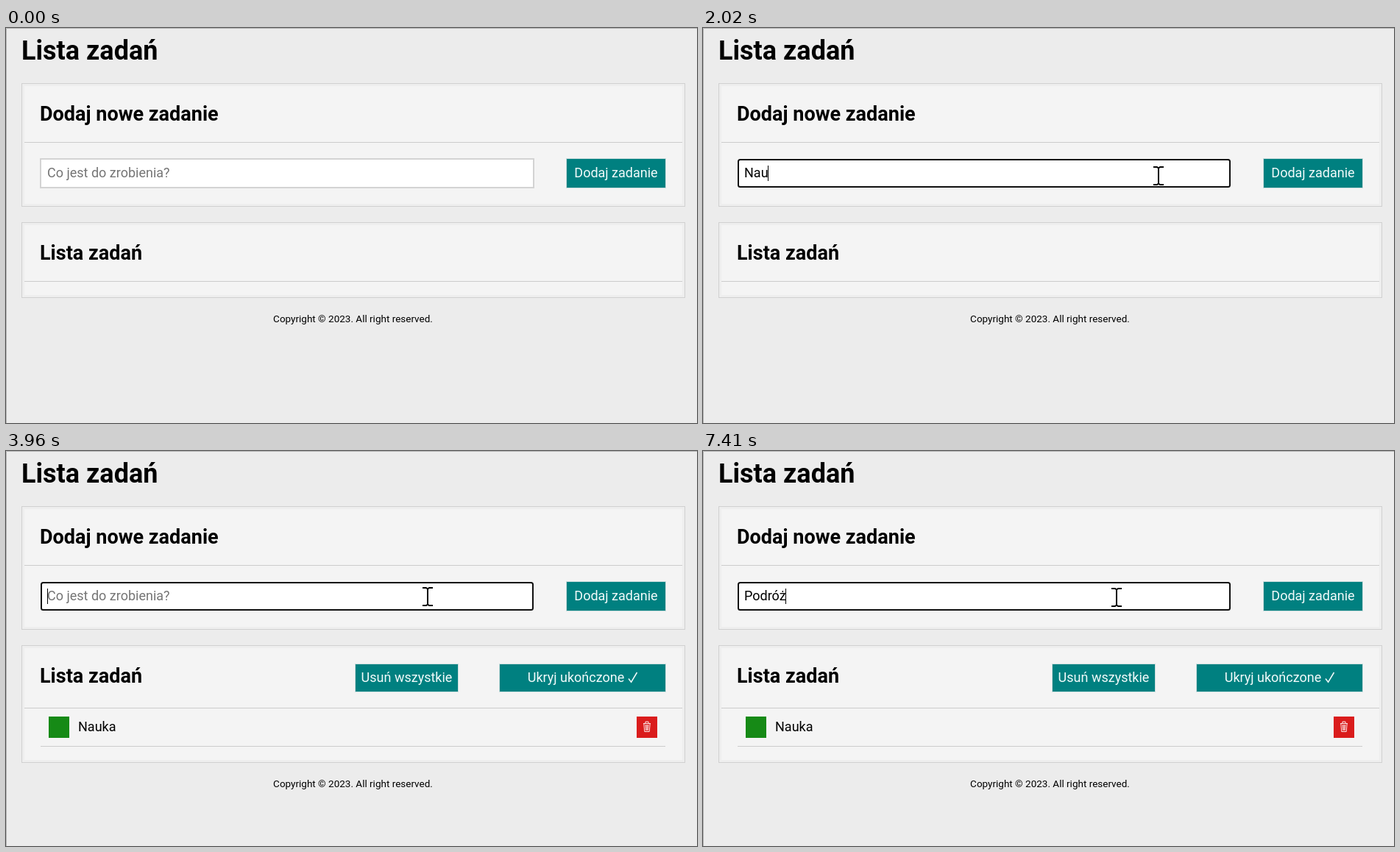
Animation of 939 by 537 pixels, one loop 8 s. Source, as an HTML page:

```html
<!DOCTYPE html>
<html lang="pl">
<head>
<meta charset="utf-8">
<title>Lista zadań</title>
<style>
html, body { margin: 0; width: 100%; height: 100%; overflow: hidden; background: #ececec; }
svg { display: block; width: 939px; height: 537px; font: 18px Roboto, sans-serif; }
h1, .h1 { font-size: 36px; font-weight: 700; }
.h2 { font-size: 27px; font-weight: 700; }
.small { font-size: 13.5px; }
.mid { text-anchor: middle; }
.frame { fill: #eee; stroke: #d0d0d0; }
.panel { fill: #f4f4f4; }
.line { fill: #ccc; }
.btn rect { fill: teal; stroke: #c9dcdc; }
.btn text { fill: #f2fafa; text-anchor: middle; }
.hint { fill: #757575; }
.field { fill: #fff; stroke: #d3d3d3; stroke-width: 2; }
.ring { fill: #fff; stroke: #101010; stroke-width: 2; }
.ring, .full, .focus .field { display: none; }
.focus .ring, .done .full { display: inline; }
.done .empty { display: none; }

#add { transform-origin: 829px 197.5px; animation: grow 8s linear infinite; }
#add rect { animation: tint 8s linear infinite; }
#pointer { animation: move 8s linear infinite; }
#pointer path { stroke-linejoin: round; }
#arrow { animation: arrow 8s step-end infinite; }
#beam { animation: beam 8s step-end infinite; }
#hand { animation: hand 8s step-end infinite; }
#click { animation: click 8s step-end infinite; }

@keyframes move {
  0%, .875% { transform: translate(868px, 496px); animation-timing-function: ease-out; }
  8.6%, 12.5% { transform: translate(619px, 201px); animation-timing-function: step-end; }
  12.625%, 33.5% { transform: translate(619px, 200px); animation-timing-function: ease-in-out; }
  38.4%, 38.9% { transform: translate(843px, 223px); animation-timing-function: ease-out; }
  42%, 46.6% { transform: translate(843px, 203px); animation-timing-function: ease-in; }
  48.6% { transform: translate(670px, 201px); }
  49.5% { transform: translate(573px, 197px); animation-timing-function: ease-out; }
  56.1%, 100% { transform: translate(562px, 198px); }
}
@keyframes arrow {
  0% { opacity: 0; } .875% { opacity: 1; } 6.8% { opacity: 0; }
  36.1% { opacity: 1; } 39.4% { opacity: 0; }
  47.7% { opacity: 1; } 48.8%, 100% { opacity: 0; }
}
@keyframes beam {
  0% { opacity: 0; } 6.8% { opacity: 1; } 36.1% { opacity: 0; }
  48.8%, 100% { opacity: 1; }
}
@keyframes hand {
  0% { opacity: 0; } 39.4% { opacity: 1; } 47.7%, 100% { opacity: 0; }
}
@keyframes click {
  0% { opacity: 0; } 8.75% { opacity: 1; } 10.25% { opacity: 0; }
  43.375% { opacity: 1; } 45.875%, 100% { opacity: 0; }
}
@keyframes grow {
  0%, 39.4% { transform: none; }
  41.5%, 47.6% { transform: scale(1.1); }
  49.3%, 100% { transform: none; }
}
@keyframes tint {
  0%, 39.4% { fill: teal; }
  41.5%, 47.6% { fill: #3ba8a8; }
  49.3%, 100% { fill: teal; }
}
</style>
</head>
<body>
<svg id="app" viewBox="0 0 939 537">
  <path d="M.5 537V.5H939" fill="none" stroke="#b4b4b4"/>
  <text class="h1" x="21" y="43">Lista zadań</text>

  <rect class="frame" x="21.5" y="75.5" width="901" height="167"/>
  <rect class="panel" x="25" y="79" width="894" height="160"/>
  <rect class="line" x="25" y="155" width="894" height="1"/>
  <text class="h2" x="46" y="126">Dodaj nowe zadanie</text>
  <rect class="field" x="47" y="178" width="670" height="39"/>
  <rect class="ring" x="48" y="179" width="668" height="37" rx="2.5"/>
  <text id="hint" class="hint" x="56" y="203">Co jest do zrobienia?</text>
  <text id="typed" x="56" y="203"></text>
  <rect id="caret" y="187" width="1" height="21"/>
  <g id="add" class="btn">
    <rect x="761.5" y="177.5" width="135" height="40"/>
    <text x="829" y="203">Dodaj zadanie</text>
  </g>

  <g class="empty">
    <rect class="frame" x="21.5" y="264.5" width="901" height="102"/>
    <rect class="panel" x="25" y="268" width="894" height="95"/>
    <rect class="line" x="25" y="344" width="894" height="1"/>
    <text class="small mid" x="471.5" y="400">Copyright © 2023. All right reserved.</text>
  </g>
  <g class="full">
    <rect class="frame" x="21.5" y="264.5" width="901" height="159"/>
    <rect class="panel" x="25" y="268" width="894" height="152"/>
    <rect class="line" x="25" y="349" width="894" height="1"/>
    <g class="btn">
      <rect x="474.5" y="289.5" width="140" height="38"/>
      <text x="544.5" y="314">Usuń wszystkie</text>
      <rect x="670.5" y="289.5" width="226" height="38"/>
      <text x="774.5" y="314">Ukryj ukończone</text>
      <path d="M846 309.5L849.6 314.2L857.5 301" fill="none" stroke="#f2fafa" stroke-width="1.5"/>
    </g>
    <rect x="58" y="361" width="28" height="29" fill="#168a16"/>
    <text x="98" y="381">Nauka</text>
    <rect x="857" y="361" width="28" height="29" fill="#da1c1c"/>
    <path d="M866 370.5H876M869 370V368H873V370M866.9 371L867.8 381.5H874.2L875.1 371M869.3 372L869.8 380M871 372V380M872.7 372L872.2 380" fill="none" stroke="#fff" stroke-width=".9"/>
    <rect class="line" x="47" y="401" width="849" height="1"/>
    <text class="small mid" x="471.5" y="457">Copyright © 2023. All right reserved.</text>
  </g>
  <text class="h2" x="46" y="315">Lista zadań</text>

  <g id="pointer">
    <path id="arrow" d="M.5 .5V24.5L6 19.5L9.5 27L13 25.5L10 18H17.5Z" fill="#fff" stroke="#000"/>
    <path id="beam" d="M-7-11H-2L0-9.5L2-11H7M-7 13H-2L0 11.5L2 13H7M0-10V12" fill="none" stroke="#000" stroke-width="2"/>
    <path id="hand" d="M-1.5 17V2Q-1.5 0 .5 0T2.5 2V10Q3 8.5 5 9T7 11Q8 9.5 9.7 10T11.3 12Q12 11 13.2 11.5T14.5 14V21Q14.5 25 12 28V29Q11.5 31 9 31H2Q0 31-1.5 28L-8.5 18Q-10.5 15-8 14.3Q-6 14-1.5 19Z" fill="#fff" stroke="#000" stroke-width="1.1"/>
    <path d="M2.5 10V16M7 11V16M11.3 12V16" id="hand2" stroke="#000" style="animation:hand 8s step-end infinite"/>
    <circle id="click" cy="-1" r="18" fill="#ff0" fill-opacity=".5"/>
  </g>
</svg>
<script>
const $ = id => document.getElementById(id);
const app = $('app'), typed = $('typed'), hint = $('hint'), caret = $('caret');
const clock = $('pointer').getAnimations()[0];

// [time, field text]; each change restarts the caret blink
const edits = [
  [750, ''], [1490, 'N'], [1690, 'Na'], [1890, 'Nau'], [2020, 'Nauk'], [2150, 'Nauka'],
  [3670, ''], [5020, 'P'], [5150, 'Po'], [5410, 'Pod'], [6340, 'Podr'],
  [6730, 'Podró'], [7140, 'Podróż'], [7410, 'Podróże']
];
const blink = 530;
let shown;

function draw() {
  const t = (clock.currentTime || 0) % 8000;
  const [since, text] = edits.findLast(e => e[0] <= t) || [0, ''];
  const focus = t >= 750 && t < 3470 || t >= 3670;
  app.classList.toggle('focus', focus);
  app.classList.toggle('done', t >= 3670);
  if (text !== shown) {
    typed.textContent = shown = text;
    hint.style.display = text ? 'none' : '';
    caret.setAttribute('x', 56 + Math.floor(text ? typed.getComputedTextLength() : 0));
  }
  const lit = t >= 7410 || Math.floor((t - since) / blink) % 2 === 0;
  caret.style.opacity = focus && lit ? 1 : 0;
  requestAnimationFrame(draw);
}
draw();
</script>
</body>
</html>
```
